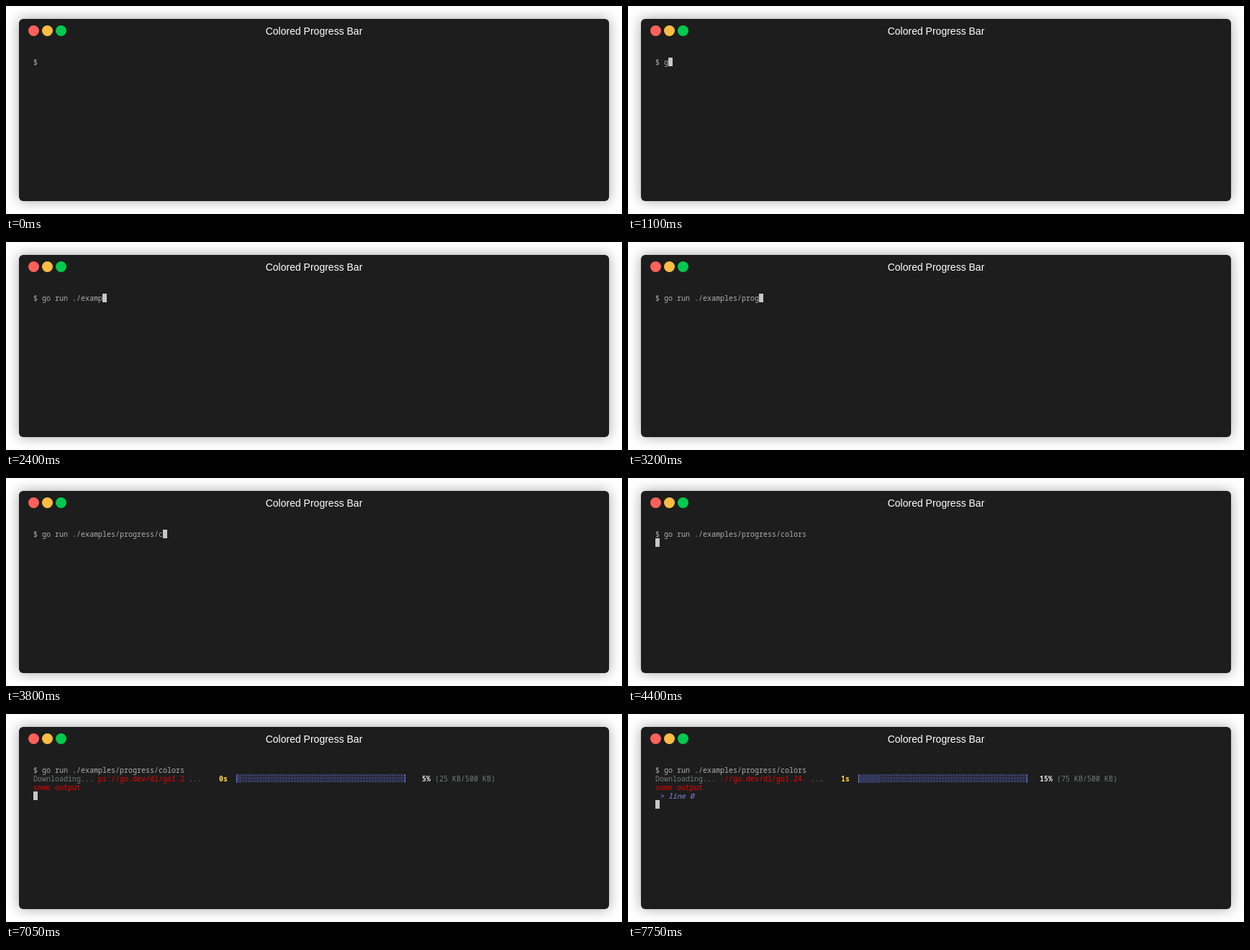
Recreate the animation shown at these times as an HTML page with a canvas. Size 856 by 290 pixels, loop 8000 ms.

```html
<!DOCTYPE html>
<html lang="en">
<head>
<meta charset="utf-8">
<title>Colored Progress Bar</title>
<style>
  html, body { margin: 0; width: 856px; height: 290px; overflow: hidden; background: #fff; }
  #window {
    position: absolute; left: 18px; top: 18px; width: 820px; height: 254px;
    background: #1d1d1d; border-radius: 6px; box-shadow: 0 0 18px rgba(0, 0, 0, .35);
  }
  #title {
    position: absolute; left: 0; top: 9px; width: 820px; text-align: center;
    font: 14px/16px "Liberation Sans", Arial, sans-serif; color: #fff;
  }
  .dot { position: absolute; top: 9px; width: 15px; height: 15px; border-radius: 50%; }
  #screen {
    position: absolute; left: 20px; top: 54px;
    font: 10px/12px "Noto Sans Mono", "DejaVu Sans Mono", monospace;
    font-variant-ligatures: none; color: #afafaf; white-space: pre;
  }
  #screen > * { position: absolute; }
  .run { height: 12px; }
  #cursor { width: 6px; height: 12px; background: #c7c7c7; }
</style>
</head>
<body>
<div id="window">
  <div class="dot" style="left:13px;background:#ff605c"></div>
  <div class="dot" style="left:32px;background:#ffbd44"></div>
  <div class="dot" style="left:51px;background:#00ca4e"></div>
  <div id="title">Colored Progress Bar</div>
  <div id="screen">
    <canvas id="bar" width="235" height="12"></canvas>
    <div id="cursor"></div>
  </div>
</div>
<script>
const LOOP = 8000, CELL = 6, ROW = 12;
const COMMAND = "go run ./examples/progress/colors";
const URL_TEXT = "https://go.dev/dl/go1.24.0.src";
const TYPE_START = 1100, ENTER = 4400, OUTPUT = 6150;
const PAUSES = [1500, 1900, 2100, 3000, 3700];
const SCROLLS = [6450, 6750, 7050, 7350, 7750];
const TICKS = [6650, 7150, 7750];
const GREY = "#747c7a", RED = "#f20000", BLUE = "#6478e8";

const $ = id => document.getElementById(id);
const screen_ = $("screen"), cursor = $("cursor"), bar = $("bar");
const ctx = bar.getContext("2d");

function place(el, col, row) {
  el.style.left = col * CELL + "px";
  el.style.top = row * ROW + "px";
}

function run(col, row, color, style = "") {
  const el = document.createElement("div");
  el.className = "run";
  el.style.cssText = (color ? `color:${color};` : "") + style;
  place(el, col, row);
  screen_.append(el);
  return el;
}

function put(el, text) {
  if (el.textContent !== text) el.textContent = text;
}

const bold = "font-weight:700";
const prompt = run(0, 0);
const label = run(0, 1, GREY);
const link = run(15, 1, RED);
const dots = run(36, 1, GREY);
const clock = run(43, 1, "#ffd242", bold);
const percent = run(89, 1, "#d8d8d8", bold);
const amount = run(93, 1, GREY);
const note = run(0, 2, RED);
const line = run(0, 3, "#7f92e6", "font-style:italic");
place(bar, 47, 1);
screen_.append(cursor);

function shade(x0, x1, dense) {
  for (let y = 0; y < ROW; y++)
    for (let x = x0; x < x1; x++) {
      const lit = dense ? (x + y) % 2 === 0 : x % 2 === 0 && y % 2 === 0 || x % 4 === 1 && y % 4 === 1;
      if (lit) ctx.fillRect(x, y, 1, 1);
    }
}

function drawBar(part) {
  const split = Math.floor(39 * part) * CELL;
  ctx.clearRect(0, 0, 235, ROW);
  ctx.fillStyle = BLUE;
  ctx.globalAlpha = .6;
  shade(1, split, true);
  ctx.globalAlpha = .75;
  shade(Math.max(1, split), 234, false);
  ctx.globalAlpha = 1;
  ctx.fillRect(0, 0, 1, ROW);
  ctx.fillRect(234, 0, 1, ROW);
}

const passed = (times, t) => times.filter(at => t >= at).length;

function typedCount(t) {
  if (t < TYPE_START) return 0;
  let step = Math.floor(t / 100) * 100;
  if (PAUSES.includes(step)) step -= 100;
  return Math.min(COMMAND.length, (step - TYPE_START) / 100 + 1);
}

let lastTick = -1;

function render(t) {
  const typed = typedCount(t), on = t >= OUTPUT;
  const tick = passed(TICKS, t), offset = passed(SCROLLS, t);
  const second = t >= TICKS[1];
  const show = text => on ? text : "";

  put(prompt, "$ " + COMMAND.slice(0, typed));
  put(label, show("Downloading..."));
  put(link, show(URL_TEXT.slice(offset, offset + 20)));
  put(dots, show("..."));
  put(clock, show(second ? "1s" : "0s"));
  put(percent, show(`${tick * 5}%`.padStart(3)));
  put(amount, show(tick ? `(${tick * 25} KB/500 KB)` : "(0/500 KB)"));
  put(note, show("some output"));
  put(line, second ? " > line 0" : "");

  bar.style.display = on ? "block" : "none";
  if (tick !== lastTick) drawBar(tick * .05);
  lastTick = tick;

  cursor.style.display = t < 100 ? "none" : "block";
  if (t < ENTER) place(cursor, 2 + typed, 0);
  else place(cursor, 0, second ? 4 : on ? 3 : 1);
}

const start = performance.now();
function frame() {
  render((performance.now() - start) % LOOP);
  requestAnimationFrame(frame);
}
render(0);
requestAnimationFrame(frame);
</script>
</body>
</html>
```
